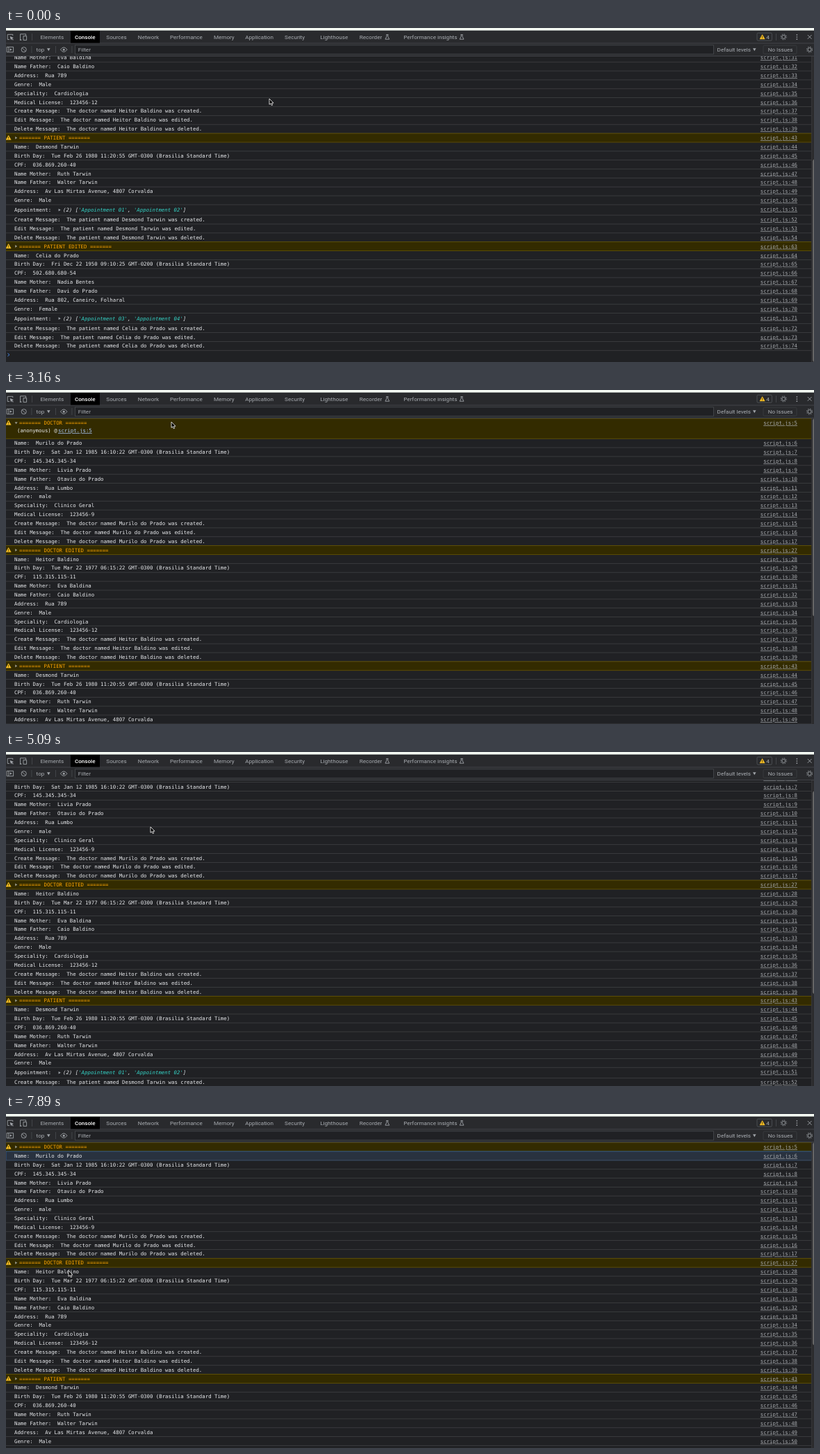
Recreate the animation shown at these times as an HTML page. Size 1163 px wide and 482 px high, loop 8 s.

```html
<!DOCTYPE html>
<html lang="en">
<head>
<meta charset="utf-8">
<title>Console</title>
<style>
  html, body { margin: 0; width: 100%; height: 100%; overflow: hidden; background: #202124; }
  svg { display: block; width: 100%; height: 100%; }
  text { white-space: pre; }
  .mono { font: 7.37px "DejaVu Sans Mono", monospace; fill: #e8eaed; }
  .ui { font: 8.1px Roboto, "Liberation Sans", sans-serif; fill: #a9adb2; }
  .link { fill: #a6a9ad; text-decoration: underline; text-anchor: end; }
  .warn { fill: #fda500; }
  .mid { text-anchor: middle; }
  .icon { fill: none; stroke: #a0a4a9; stroke-width: .9; }
  .solid { fill: #a0a4a9; }
</style>
</head>
<body>
<svg viewBox="0 0 1163 482" id="stage"></svg>
<script>
const stage = document.getElementById('stage');
const ROW = 12.865, LIST_ROW = 15.1, TOP = 41.07, VIEW = 441;
const MAX_SCROLL = 223.5, TRACE = 16.3;
const STEP = 147.7, STEP_START = 1680, LOOP = 8000;

function add(parent, tag, attrs = {}, content) {
  const node = document.createElementNS('http://www.w3.org/2000/svg', tag);
  for (const key in attrs) node.setAttribute(key, attrs[key]);
  if (content !== undefined) node.textContent = content;
  parent.appendChild(node);
  return node;
}
const box = (parent, x, y, width, height, fill, more) =>
  add(parent, 'rect', { x, y, width, height, fill, ...more });
const label = (parent, x, y, content, cls) => add(parent, 'text', { x, y, class: cls }, content);
const path = (parent, d, attrs) => add(parent, 'path', { d, ...attrs });

const people = [
  { kind: 'doctor', title: 'DOCTOR', line: 5, name: 'Murilo do Prado',
    born: 'Sat Jan 12 1985 16:10:22 GMT-0300', cpf: '145.345.345-34',
    mother: 'Livia Prado', father: 'Otavio do Prado', address: 'Rua Lumbo',
    genre: 'male', job: 'Clinico Geral', license: '123456-9' },
  { kind: 'doctor', title: 'DOCTOR EDITED', line: 27, name: 'Heitor Baldino',
    born: 'Tue Mar 22 1977 06:15:22 GMT-0300', cpf: '115.315.115-11',
    mother: 'Eva Baldina', father: 'Caio Baldino', address: 'Rua 789',
    genre: 'Male', job: 'Cardiologia', license: '123456-12' },
  { kind: 'patient', title: 'PATIENT', line: 43, name: 'Desmond Tarwin',
    born: 'Tue Feb 26 1980 11:20:55 GMT-0300', cpf: '036.869.260-40',
    mother: 'Ruth Tarwin', father: 'Walter Tarwin',
    address: 'Av Las Mirtas Avenue, 4807 Corvalda', genre: 'Male', visits: ['01', '02'] },
  { kind: 'patient', title: 'PATIENT EDITED', line: 63, name: 'Celia do Prado',
    born: 'Fri Dec 22 1950 09:10:25 GMT-0200', cpf: '502.680.680-54',
    mother: 'Nadia Bentes', father: 'Davi do Prado',
    address: 'Rua 802, Caneiro, Folharal', genre: 'Female', visits: ['03', '04'] }
];

function fieldsOf(p) {
  const message = verb => `The ${p.kind} named ${p.name} was ${verb}.`;
  const extra = p.visits ? [['Appointment', p.visits]]
    : [['Speciality', p.job], ['Medical License', p.license]];
  return [
    ['Name', p.name], ['Birth Day', `${p.born} (Brasilia Standard Time)`], ['CPF', p.cpf],
    ['Name Mother', p.mother], ['Name Father', p.father], ['Address', p.address],
    ['Genre', p.genre], ...extra,
    ['Create Message', message('created')], ['Edit Message', message('edited')],
    ['Delete Message', message('deleted')]
  ];
}

// Console rows
box(stage, 0, 0, 1163, 482, '#202124');
const list = add(stage, 'g');
const head = add(list, 'g'), rest = add(list, 'g');
const rowTops = [];
let y = TOP;

function warnIcon(g, x, cy) {
  path(g, `M${x} ${cy - 3.2}l3.6 6.4h-7.2z`,
    { fill: '#f5bd25', stroke: '#f5bd25', 'stroke-width': .5, 'stroke-linejoin': 'round' });
  box(g, x - .4, cy - 1.2, .8, 2.2, '#332b00');
  box(g, x - .4, cy + 1.6, .8, .8, '#332b00');
}
const lineLink = (g, cy, n) => label(g, 1139, cy + 2.6, `script.js:${n}`, 'mono link');

function titleRow(g, p) {
  const cy = y + ROW / 2;
  const back = box(g, 0, y, 1159.5, ROW, '#332b00');
  box(g, 0, y - .4, 1159.5, .8, '#665500');
  const edge = box(g, 0, y + ROW - .4, 1159.5, .8, '#665500');
  warnIcon(g, 3.6, cy - .4);
  const arrow = path(g, `M13.2 ${cy - 2}l3 2l-3 2z`, { fill: '#9a9a8c' });
  label(g, 19, cy + 2.6, `======= ${p.title} =======`, 'mono warn');
  lineLink(g, cy, p.line);
  rowTops.push(y);
  y += ROW;
  return { back, edge, arrow };
}

function fieldRow(g, key, value, n) {
  const isList = Array.isArray(value);
  const height = isList ? LIST_ROW : ROW;
  const cy = y + height / 2;
  box(g, 0, y + height - .4, 1159.5, .8, '#3f4043');
  const line = label(g, 12, cy + 2.6, `${key}:  ${isList ? '' : value}`, 'mono');
  if (isList) {
    path(g, `M75.6 ${cy - 1.9}l3.2 1.9l-3.2 1.9z`, { fill: '#9aa0a6' });
    const preview = add(g, 'text', { x: 82, y: cy + 2.6, class: 'mono', 'font-style': 'italic' });
    preview.style.fontStyle = 'italic';
    const span = (s, fill) => add(preview, 'tspan', { fill }, s);
    span('(2) [', '#e8eaed');
    span(`'Appointment ${value[0]}'`, '#35d4c7');
    span(', ', '#e8eaed');
    span(`'Appointment ${value[1]}'`, '#35d4c7');
    span(']', '#e8eaed');
  }
  lineLink(g, cy - (isList ? 1 : 0), n);
  rowTops.push(y);
  y += height;
}

const mark = box(rest, 0, 0, 1159.5, ROW, '#29323f', { stroke: '#2f5c96', 'stroke-width': .9 });
let first;
people.forEach((p, i) => {
  const parts = titleRow(i ? rest : head, p);
  if (!i) first = parts;
  fieldsOf(p).forEach(([key, value], j) => fieldRow(rest, key, value, p.line + j + 1));
});
path(rest, `M2.4 ${y + 4.2}l2.6 2.1l-2.6 2.1`, { fill: 'none', stroke: '#4a8df0', 'stroke-width': .9 });

// Stack trace of the first warning
const trace = add(head, 'g');
label(trace, 16, 61.2, '(anonymous) @', 'mono');
label(trace, 75, 61.2, 'script.js:5', 'mono').setAttribute('style', 'fill:#a8c7fa;text-decoration:underline');

// Scrollbar
box(stage, 1159.5, 40, 3.5, 442, '#2b2b2d');
box(stage, 1159.4, 40, .7, 442, '#3f4043');
const thumb = box(stage, 1161.2, 0, 7, 10, '#6b6b6b', { rx: 3 });

// Tab bar and toolbar
const bar = add(stage, 'g');
box(bar, 0, 0, 1163, 41, '#292a2d');
box(bar, 0, 0, 1163, 3.6, '#f3f8f2');
box(bar, 0, 21.6, 1163, .8, '#494c50');
box(bar, 0, 40.2, 1163, .8, '#494c50');
box(bar, 93, 4, 42, 17.6, '#000');
const tabs = { Elements: 66.3, Console: 113.7, Sources: 159, Network: 205, Performance: 259.4,
  Memory: 313.8, Application: 364.6, Security: 415.6, Lighthouse: 472.2, Recorder: 525,
  'Performance insights': 610.8 };
for (const name in tabs) {
  const tab = label(bar, tabs[name], 15.7, name, 'ui mid');
  if (name === 'Console') tab.setAttribute('style', 'fill:#fff;font-weight:500');
}
for (const x of [548.8, 656])
  path(bar, `M${x - 1.6} 9.6h3.2M${x - .9} 9.8v2.4l-2 4h5.8l-2-4v-2.4`, { class: 'icon' });

const split = (x, top) => box(bar, x, top, .8, 10, '#494c50');
split(37, 8); split(1108, 8);
split(36.5, 26); split(71, 26); split(94.5, 26);

// Inspect and device icons
path(bar, 'M9.8 11V9.3H2.2V16.6H5', { class: 'icon' });
path(bar, 'M5.6 12l5.4 2.1-2.2.8 2 2-.8.8-2-2-.8 2z', { class: 'solid' });
path(bar, 'M22 17h-1.4V8.8h8V11M22.4 17.4H19.8', { class: 'icon' });
path(bar, 'M25 11.6h4.6v6H25z', { class: 'icon' });

// Sidebar, clear, eye
path(bar, 'M1.2 27.4h9.4v7.4H1.2zM3.8 27.4v7.4', { class: 'icon' });
path(bar, 'M5.6 29.2l3 1.9-3 1.9z', { class: 'solid' });
add(bar, 'circle', { cx: 25.7, cy: 31.2, r: 3.6, class: 'icon' });
path(bar, 'M23.2 28.7l5 5', { class: 'icon' });
path(bar, 'M78.4 31.2q4.8-6.6 9.6 0q-4.8 6.6-9.6 0z', { class: 'icon' });
add(bar, 'circle', { cx: 83.2, cy: 31.2, r: 1.5, class: 'solid' });

const drop = x => path(bar, `M${x} 29.3h4.6l-2.3 4z`, { class: 'solid' });
label(bar, 43.6, 34.1, 'top', 'ui'); drop(59);
box(bar, 99.4, 24.8, 919, 13, '#202124', { stroke: '#494c50', 'stroke-width': .8 });
label(bar, 103.8, 34.1, 'Filter', 'ui');
label(bar, 1023.6, 34.1, 'Default levels', 'ui'); drop(1075);
box(bar, 1090, 25.2, 48, 12.2, 'none', { rx: 1.5, stroke: '#3f4246', 'stroke-width': .7 });
label(bar, 1114.6, 34.1, 'No Issues', 'ui mid');

box(bar, 1081, 7.2, 21.4, 11, 'none', { rx: 1.5, stroke: '#55585c', 'stroke-width': .8 });
warnIcon(bar, 1088.6, 12.8);
label(bar, 1094.2, 15.7, '4', 'ui');

function gear(x, cy) {
  add(bar, 'circle', { cx: x, cy, r: 2.5, class: 'icon', 'stroke-width': 1.2 });
  add(bar, 'circle', { cx: x, cy, r: 4, class: 'icon', 'stroke-dasharray': '1.57 1.57' });
}
gear(1119.3, 12.9);
gear(1156.6, 31.2);
for (const dy of [-3.2, 0, 3.2]) add(bar, 'circle', { cx: 1138.4, cy: 13 + dy, r: .85, class: 'solid' });
path(bar, 'M1153.8 10l5.8 5.8m0-5.8l-5.8 5.8', { class: 'icon' });

const pointer = path(stage, 'M0 0V8.4L1.9 6.7L3.2 9.7L4.7 9.1L3.4 6.2H6z',
  { fill: '#000', stroke: '#fff', 'stroke-width': .8, 'stroke-linejoin': 'round' });

// Step, pointer x, pointer y, scroll
const moves = [
  [-4, 379, 102, MAX_SCROLL], [-3, 379.5, 103, MAX_SCROLL], [-2, 379, 102, MAX_SCROLL],
  [-1, 379, 102, MAX_SCROLL], [0, 376, 99, 200], [1, 368, 95, 80], [2, 358, 91, 0],
  [9, 240, 47, 0], [10, 238, 46, 0], [15, 200, 46, 0], [17, 157, 48, 0],
  [20, 175, 75, 0], [23, 208, 108, 23.2], [26, 180, 140, 40], [29, 137, 167, 31],
  [31, 130, 110, 0], [33, 122, 59, 0], [34, 120, 61, 0], [39, 101, 201, 0], [42, 90, 226, 0]
];

function poseAt(step) {
  const next = moves.findIndex(m => m[0] >= step);
  if (next < 0) return moves[moves.length - 1];
  if (next === 0) return moves[0];
  const a = moves[next - 1], b = moves[next];
  const part = (step - a[0]) / (b[0] - a[0]);
  return a.map((v, i) => v + (b[i] - v) * part);
}

function selectedRow(step) {
  if (step >= -8 && step < 9) return 22;
  return step >= 33 ? 1 : -1;
}

function draw(time) {
  const step = Math.floor((time - STEP_START) / STEP);
  const [, x, py, scroll] = poseAt(step);
  const open = step >= 9 && step < 15;
  const grow = open ? TRACE : 0;

  list.setAttribute('transform', `translate(0 ${-scroll})`);
  rest.setAttribute('transform', `translate(0 ${grow})`);
  trace.setAttribute('visibility', open ? 'visible' : 'hidden');
  first.back.setAttribute('height', ROW + grow);
  first.edge.setAttribute('y', TOP + ROW + grow - .4);
  first.arrow.setAttribute('d', open ? 'M12.6 46.2h4l-2 3z' : 'M13.2 45.5l3 2l-3 2z');

  const row = selectedRow(step);
  mark.setAttribute('visibility', row < 0 ? 'hidden' : 'visible');
  if (row >= 0) mark.setAttribute('y', rowTops[row]);

  const ratio = VIEW / (VIEW + MAX_SCROLL + grow);
  thumb.setAttribute('y', TOP + scroll * ratio);
  thumb.setAttribute('height', VIEW * ratio);
  pointer.setAttribute('transform', `translate(${x} ${py})`);
}

function tick(now) {
  draw(now % LOOP);
  requestAnimationFrame(tick);
}
draw(0);
requestAnimationFrame(tick);
</script>
</body>
</html>
```
